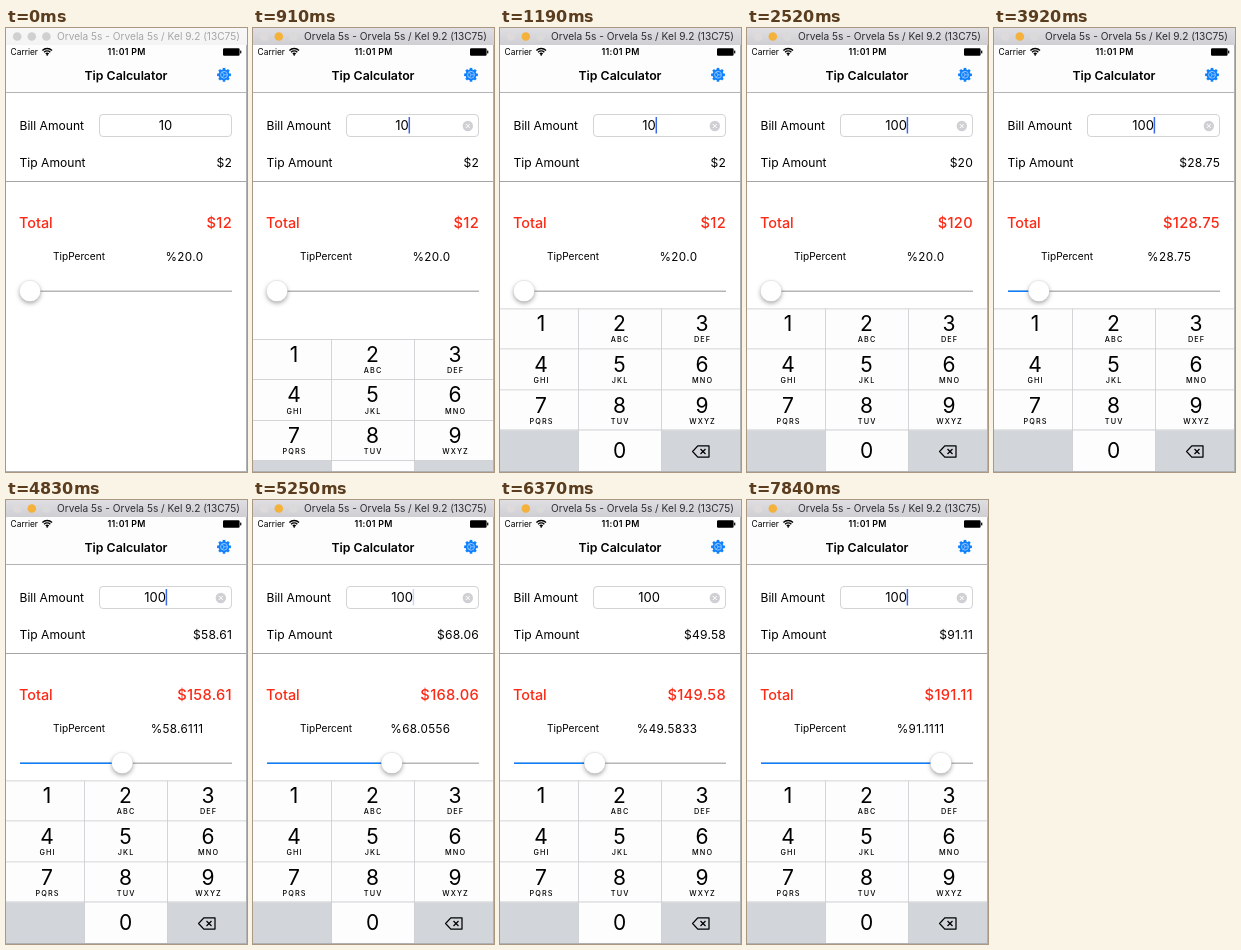
An HTML page with a canvas that plays this animation: 241 px wide and 444 px high, repeating every 8 s.

```html
<!DOCTYPE html>
<html lang="en">
<head>
<meta charset="utf-8">
<title>Tip Calculator</title>
<style>
  html, body { margin: 0; width: 100%; height: 100%; overflow: hidden; background: #fff; }
  canvas { display: block; width: 241px; height: 444px; }
</style>
</head>
<body>
<canvas id="stage"></canvas>
<script>
const W = 241, H = 444, LOOP = 8000, TICK = 70;
const BLUE = '#0f80fd', RED = '#fb2a16', INK = '#000', RULE = '#b4b4b6', EDGE = '#b0b1b3';
const FONT = 'Inter, Roboto, "Liberation Sans", sans-serif';
const KEYBOARD_Y = 280.5, ROW = 40.6, COLS = [78.5, 161.5], MIDS = [41, 119.5, 202];
const LETTERS = ['', 'ABC', 'DEF', 'GHI', 'JKL', 'MNO', 'PQRS', 'TUV', 'WXYZ'];
const FOCUS = 700, PRESS = 2310, TYPED = 2450, RELEASE = 2520;

// Slider drag: [time, percent]
const DRAG = [
  [3780, 20], [3920, 28.75], [4360, 43], [4830, 58.6111], [5110, 67], [5250, 68],
  [5530, 50], [5740, 31], [5810, 29], [6160, 30.5], [6370, 49.5833], [6650, 77],
  [6860, 90], [6930, 91.1111]
];

const canvas = document.getElementById('stage');
const c = canvas.getContext('2d');
const dpr = window.devicePixelRatio || 1;
canvas.width = W * dpr;
canvas.height = H * dpr;

const clamp = v => Math.max(0, Math.min(1, v));
const ramp = (t, a, b) => clamp((t - a) / (b - a));

function rect(x, y, w, h, fill) {
  c.fillStyle = fill;
  c.fillRect(x, y, w, h);
}

function disc(x, y, r, fill) {
  c.beginPath();
  c.arc(x, y, r, 0, 2 * Math.PI);
  c.fillStyle = fill;
  c.fill();
}

function line(points, color, width) {
  c.beginPath();
  points.forEach(([x, y], i) => i ? c.lineTo(x, y) : c.moveTo(x, y));
  c.strokeStyle = color;
  c.lineWidth = width;
  c.stroke();
}

function cross(x, y, r, color, width) {
  line([[x - r, y - r], [x + r, y + r]], color, width);
  line([[x - r, y + r], [x + r, y - r]], color, width);
}

function text(str, x, y, size, { align = 'left', color = INK, weight = 400, spacing = 0 } = {}) {
  c.font = `${weight} ${size}px ${FONT}`;
  c.letterSpacing = spacing + 'px';
  c.textAlign = align;
  c.fillStyle = color;
  c.fillText(str, x, y);
  return c.measureText(str).width;
}

function percentAt(t) {
  const next = DRAG.findIndex(p => p[0] > t);
  if (next === 0) return DRAG[0][1];
  if (next < 0) return DRAG[DRAG.length - 1][1];
  const [t0, v0] = DRAG[next - 1], [t1, v1] = DRAG[next];
  return v0 + (v1 - v0) * ramp(t, t0, t1);
}

// The slider moves in fixed steps of 80 / 576.
const snap = v => 20 + Math.round((v - 20) * 7.2) / 7.2;

function cursorAlpha(t) {
  const start = t < TYPED ? 1330 : 3010;
  if (t < start) return 1;
  const p = (t - start) % 1050;
  return p < 420 ? 1 - ramp(p, -70, 210) : ramp(p, 420, 630);
}

function titleBar(active) {
  const g = c.createLinearGradient(0, 0, 0, 17);
  g.addColorStop(0, active ? '#dfdee2' : '#f7f7f7');
  g.addColorStop(1, active ? '#cfced3' : '#f4f4f4');
  rect(0, 0, W, 17, g);
  const dots = active ? ['#dedadb', '#f4b13c', '#dadada'] : ['#d0d0d0', '#d0d0d0', '#d0d0d0'];
  dots.forEach((d, i) => disc(11.2 + i * 14.6, 8.5, 4.3, d));
  text('Orvela 5s - Orvela 5s / Kel 9.2 (13C75)', 51, 12.2, 10.15, { color: active ? '#2e2e30' : '#a6a6a6' });
}

function statusBar() {
  text('Carrier', 4.6, 27, 8.4);
  for (const r of [2, 4.4, 6.8]) {
    c.beginPath();
    c.arc(41.2, 27.3, r, -Math.PI * 0.75, -Math.PI * 0.25);
    c.strokeStyle = INK;
    c.lineWidth = 1.4;
    c.stroke();
  }
  disc(41.2, 26.8, 0.9, INK);
  text('11:01 PM', 120.6, 27.2, 8.8, { align: 'center', weight: 600, spacing: 0.3 });
  c.beginPath();
  c.roundRect(217, 20.2, 16.6, 7.6, 1.2);
  c.fillStyle = INK;
  c.fill();
  rect(234.1, 22.6, 1.2, 2.8, INK);
}

function gear(x, y) {
  c.save();
  c.translate(x, y);
  for (let i = 0; i < 8; i++) {
    c.rotate(Math.PI / 4);
    rect(-1.3, -6.9, 2.6, 3, BLUE);
  }
  disc(0, 0, 5.5, BLUE);
  c.beginPath();
  c.arc(0, 0, 3.4, 0, 2 * Math.PI);
  c.strokeStyle = '#a9d2fd';
  c.lineWidth = 0.8;
  c.stroke();
  for (let i = 0; i < 3; i++) {
    line([[0, 0], [3.4, 0]], '#a9d2fd', 0.7);
    c.rotate(Math.PI * 2 / 3);
  }
  c.restore();
}

function billField(bill, editing, alpha) {
  c.beginPath();
  c.roundRect(93.5, 86.5, 132, 22, 3.5);
  c.strokeStyle = '#d4d4d4';
  c.lineWidth = 1;
  c.stroke();
  const mid = editing ? 149 : 159.5;
  const w = text(String(bill), mid, 102, 13, { align: 'center' });
  if (!editing) return;
  c.globalAlpha = alpha;
  rect(mid + w / 2 - 0.2, 89, 1.5, 16.5, '#3d69e8');
  c.globalAlpha = 1;
  disc(214.8, 98, 5.2, '#d0d0d4');
  cross(214.8, 98, 2, '#fff', 1);
}

function slider(percent) {
  const x = 24 + (percent - 20) * 2.39, y = 263;
  rect(14, y - 0.5, 212, 1.5, '#b5b5b5');
  rect(14, y - 0.5, x - 14, 1.5, BLUE);
  c.save();
  c.shadowColor = 'rgba(0,0,0,0.32)';
  c.shadowBlur = 4 * dpr;
  c.shadowOffsetY = 2 * dpr;
  disc(x, y, 10.6, '#fff');
  c.restore();
  c.beginPath();
  c.arc(x, y, 10.6, 0, 2 * Math.PI);
  c.strokeStyle = 'rgba(0,0,0,0.13)';
  c.lineWidth = 0.5;
  c.stroke();
}

function backspace(x, y) {
  c.lineJoin = 'round';
  c.beginPath();
  [[-8.4, 0], [-3.2, -5.6], [8, -5.6], [8, 5.6], [-3.2, 5.6]].forEach(p => c.lineTo(x + p[0], y + p[1]));
  c.closePath();
  c.strokeStyle = INK;
  c.lineWidth = 1.25;
  c.stroke();
  cross(x + 2, y, 2.5, INK, 1.25);
}

function keyboard(shift, pressed) {
  c.save();
  c.translate(0, shift);
  const top = KEYBOARD_Y, last = top + 3 * ROW;
  const center = { align: 'center' };
  rect(0, top, 240, H - top, '#fdfdfd');
  rect(0, last, 240, H - last, '#d2d5da');
  rect(COLS[0], last, COLS[1] - COLS[0], H - last, '#fdfdfd');
  c.globalAlpha = pressed;
  rect(COLS[0], last, COLS[1] - COLS[0], H - last, '#d2d5da');
  c.globalAlpha = 1;
  for (let r = 0; r < 4; r++) rect(0, Math.round(top + r * ROW) - 0.5, 240, 0.8, '#c9cbce');
  for (const x of COLS) rect(x - 0.4, top, 0.8, H - top, '#c9cbce');
  LETTERS.forEach((s, i) => {
    const x = MIDS[i % 3], y = top + Math.floor(i / 3) * ROW;
    text(String(i + 1), x, y + 22.8, 21, center);
    text(s, x + 0.6, y + 33.9, 7.3, { align: 'center', weight: 500, spacing: 1.1 });
  });
  text('0', MIDS[1], 430, 21, center);
  backspace(201, 423.5);
  c.restore();
}

function draw(t) {
  const editing = t >= FOCUS;
  const bill = t < TYPED ? 10 : 100;
  const percent = snap(percentAt(t));
  const tip = bill * percent / 100;
  const money = v => '$' + +v.toFixed(2);
  const shown = Number.isInteger(percent) ? percent.toFixed(1) : String(+percent.toPrecision(6));

  c.setTransform(dpr, 0, 0, dpr, 0, 0);
  rect(0, 0, W, H, '#fff');
  rect(0, 17, W, 47, '#fdfdfd');
  rect(0, 64, W, 1, RULE);
  titleBar(editing);
  statusBar();
  text('Tip Calculator', 120, 52.3, 12.3, { align: 'center', weight: 600 });
  gear(218, 46.8);

  text('Bill Amount', 13.5, 101.6, 12.1);
  billField(bill, editing, cursorAlpha(t));
  text('Tip Amount', 13.5, 139.2, 12.1);
  text(money(tip), 226, 139.2, 12.1, { align: 'right', spacing: 0.2 });
  rect(0, 153, W, 1, '#a5a5a5');

  text('Total', 13, 200.2, 14.4, { color: RED, weight: 500 });
  text(money(bill + tip), 226, 200.2, 14.7, { align: 'right', color: RED, weight: 500, spacing: 0.3 });
  text('TipPercent', 47, 232, 10.1);
  text('%' + shown, 197.4, 232.8, 11.7, { align: 'right', spacing: 0.35 });
  slider(percent);

  if (editing) {
    const p = ramp(t, FOCUS, 1190);
    const pressed = t < PRESS ? 0 : t < TYPED ? 1 : t < RELEASE ? 0.5 : 0;
    keyboard((H - KEYBOARD_Y) * Math.pow(1 - p, 3), pressed);
  }
  rect(240, 17, 1, H - 17, EDGE);
  rect(0, H - 1, W, 1, EDGE);
}

const start = performance.now();
function loop() {
  const t = (performance.now() - start) % LOOP;
  draw(Math.floor((t + 1) / TICK) * TICK);
  requestAnimationFrame(loop);
}
loop();
</script>
</body>
</html>
```
